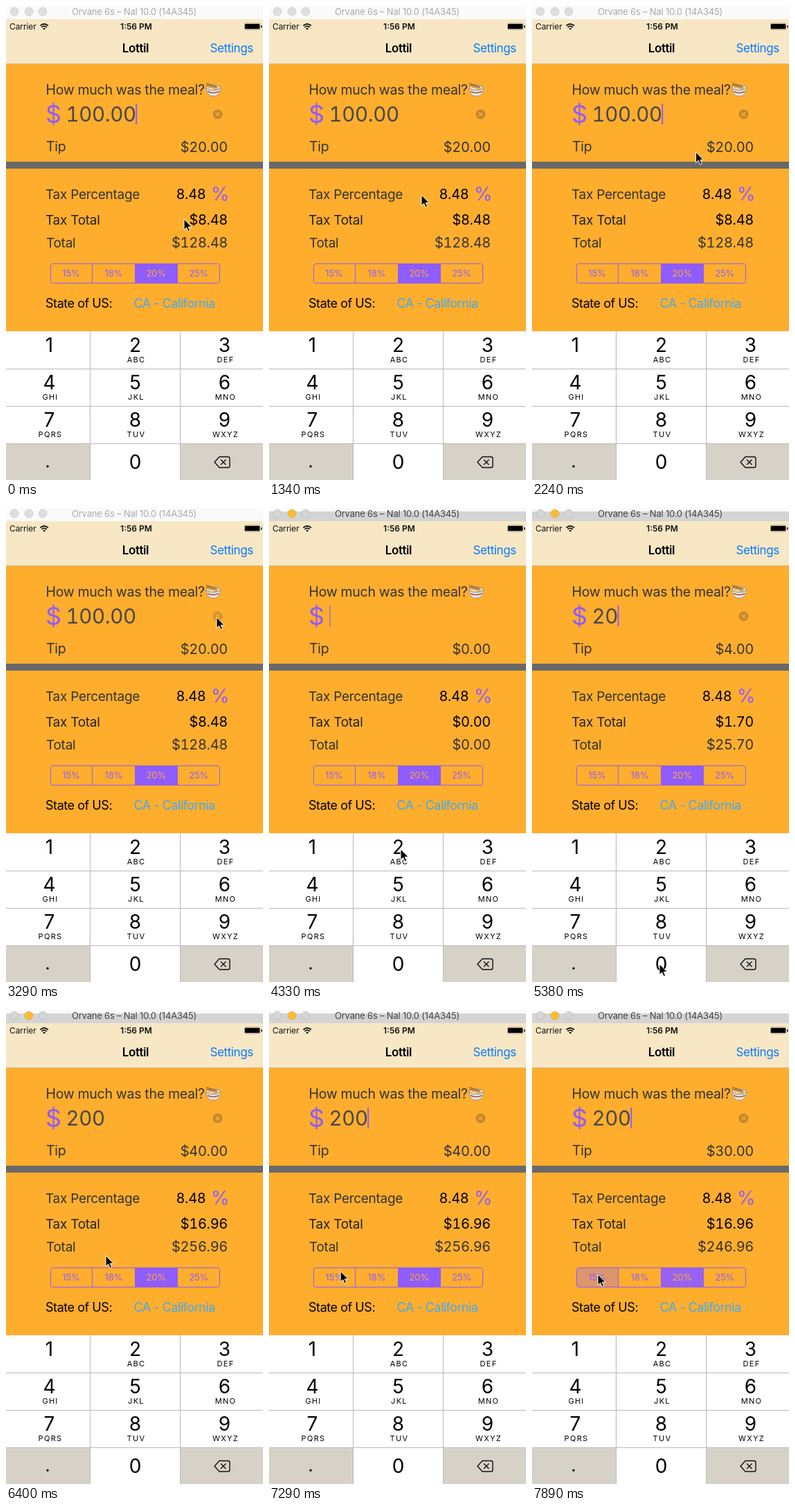
These frames come from a looping animation (371 px wide and 685 px high, 8000 ms). An HTML page:

```html
<!DOCTYPE html>
<html lang="en">
<head>
<meta charset="utf-8">
<title>Tip calculator</title>
<style>
  html, body { margin: 0; width: 100%; height: 100%; overflow: hidden; }
  svg { display: block; font-family: Inter, sans-serif; }
  text { white-space: pre; }
  .money { font-variant-numeric: tabular-nums; }
</style>
</head>
<body>
<svg id="stage" width="371" height="685" viewBox="0 0 371 685"></svg>
<script>
const LOOP = 8000, STEP = 148.8;
const ORANGE = '#ffad2d', PURPLE = '#8f5cff', INK = '#333';
const stage = document.getElementById('stage');

const rect = (x, y, w, h, fill, attrs = '') =>
  `<rect x="${x}" y="${y}" width="${w}" height="${h}" fill="${fill}" ${attrs}/>`;
const text = (x, y, size, str, fill = INK, spacing = 0, attrs = '') =>
  `<text x="${x}" y="${y}" font-size="${size}" fill="${fill}" letter-spacing="${spacing}" ${attrs}>${str}</text>`;
const path = (d, attrs) => `<path d="${d}" ${attrs}/>`;
const MID = 'text-anchor="middle"', END = 'text-anchor="end"';

function titleBar() {
  const lights = [12, 33, 53].map((x, i) =>
    `<circle id="light${i}" cx="${x}" cy="8" r="6" stroke="#000" stroke-opacity=".1"/>`).join('');
  return rect(0, 0, 371, 19, '#fafafa') + rect(0, 5, 371, 14, '#d4d4d4', 'id="bar"') + lights +
    text(185, 13, 13, 'Orvane 6s – Nal 10.0 (14A345)', '#aaa', -.2, `id="title" ${MID}`);
}

function header() {
  return rect(0, 19, 371, 64, '#f8e7c5') + rect(0, 83, 371, 1, '#d0b98e') +
    text(5, 33.5, 12, 'Carrier', '#111', -.1) +
    path('M49.5 28.5q5.7-5 11.4 0M51.5 30.8q3.7-3.2 7.4 0', 'fill="none" stroke="#111" stroke-width="1.7"') +
    path('M53.2 32.5q2-1.6 4 0l-2 2z', 'fill="#111"') +
    text(188, 33.5, 12, '1:56 PM', '#111', 0, `font-weight="600" ${MID}`) +
    rect(344.5, 25, 22, 9, 'none', 'rx="1.5" stroke="#111" stroke-opacity=".4"') +
    rect(345, 26, 21, 7, '#000', 'rx="1"') + rect(368, 28, 1.5, 3.5, '#111') +
    text(187, 67, 17, 'Lottil', '#000', -.4, `font-weight="600" ${MID}`) +
    text(294.5, 67, 17, 'Settings', '#0a7aff', -.4);
}

function noodles() {
  return path('M289 118q0 9 6.5 12h7.500q6.500-3 6.500-12z', 'fill="#e6e8e4" stroke="#8b8b83" stroke-width=".8"') +
    path('M291 123.500q8 4 16.500 0', 'fill="none" stroke="#b5493a" stroke-width="1.500"') +
    '<ellipse cx="299.200" cy="118" rx="10.300" ry="3.800" fill="#f2dca8" stroke="#8d8d86"/>' +
    path('M292 118.500q3.500-3 7 0t7 0', 'fill="none" stroke="#d49a3c" stroke-width="1.500"') +
    path('M289 111.500l16 5.500M289 114l15 4', 'stroke="#8e5630" stroke-width="1.200"');
}

function form() {
  const value = (id, y, fill) => text(320, y, 20, '', fill, -.3, `id="${id}" class="money" ${END}`);
  return rect(0, 84, 371, 386, ORANGE) + rect(0, 225, 371, 10, '#696969') +
    text(57.5, 128, 19.5, 'How much was the meal?', INK, -.3) + noodles() +
    text(57, 169, 36, '$', PURPLE) +
    text(86.5, 167, 29.5, '', '#484848', -.4, 'id="amount" class="money"') +
    rect(0, 141, 2, 30, PURPLE, 'id="caret"') +
    '<g id="clear"><circle cx="305.5" cy="156.5" r="7" fill="#c5882f"/>' +
    path('M302.8 153.8l5.4 5.4m0-5.4l-5.4 5.4', `stroke="${ORANGE}" stroke-width="1.3"`) + '</g>' +
    text(58, 210, 19.5, 'Tip', INK, -.3) + value('tip', 210.5, INK) +
    text(57, 279, 19, 'Tax Percentage', INK, -.28) +
    text(288.5, 279, 20, '8.48', '#000', -.3, `class="money" ${END}`) +
    text(296, 281, 27, '%', PURPLE) +
    text(57, 316, 19, 'Tax Total', '#222', -.28) + value('tax', 316, '#000') +
    text(58, 348.5, 19, 'Total', INK, -.28) + value('total', 348.5, INK) +
    segments() +
    text(57, 436, 18, 'State of US:', '#000', -.45) +
    text(184.5, 436, 18, 'CA - California', '#43aaf0', -.5);
}

function segments() {
  const labels = ['15%', '18%', '20%', '25%'].map((s, i) =>
    text(94 + i * 61.4, 391, 13, s, i === 2 ? ORANGE : PURPLE, -.1, MID)).join('');
  return rect(65, 373, 59.5, 27, PURPLE, 'id="pressed"') +
    rect(186, 373, 62, 27, PURPLE, 'id="selected"') +
    rect(64.5, 372.5, 244, 28, 'none', `rx="3" stroke="${PURPLE}"`) +
    path('M124.5 373v27M186.5 373v27M247.5 373v27', `stroke="${PURPLE}"`) + labels;
}

function keypad() {
  const letters = ['', 'ABC', 'DEF', 'GHI', 'JKL', 'MNO', 'PQRS', 'TUV', 'WXYZ'];
  const columns = [62.5, 186.5, 315.5];
  const keys = letters.map((word, i) => {
    const x = columns[i % 3], y = 500 + Math.floor(i / 3) * 54;
    return text(x, y, 28, i + 1, '#000', 0, MID) +
      text(x + 1.5, y + 15, 11, word, '#000', 1.3, MID);
  }).join('');
  return rect(0, 470, 371, 215, '#fff') +
    rect(0, 633, 121, 52, '#d6d2c8') + rect(252, 633, 119, 52, '#d6d2c8') +
    rect(122, 0, 129, 53, '#d6d2c8', 'id="keyDown"') +
    path('M0 524.5h371M0 578.5h371M0 632.5h371M121.5 470v215M251.5 470v215', 'stroke="#b9b9b9"') +
    keys + text(186.5, 669, 28, '0', '#000', 0, MID) +
    text(60, 667, 26, '.', '#000', 0, MID) +
    path('M308 651.5h12.5q2.5 0 2.5 2.5v10.5q0 2.5-2.5 2.5h-12.5l-7-7.7z', 'fill="none" stroke="#111" stroke-width="1.4" stroke-linejoin="round"') +
    path('M310 655.5l7.5 7.5m0-7.5l-7.5 7.5', 'stroke="#111" stroke-width="1.4"');
}

stage.innerHTML = titleBar() + header() + form() + keypad() +
  path('M0 0V15.5l3.6-3.3 2.5 5.6 2.5-1.1-2.4-5.4h4.9z', 'id="cursor" stroke="#fff"');

const el = {};
for (const node of stage.querySelectorAll('[id]')) el[node.id] = node;
const set = (id, name, value) => el[id].setAttribute(name, value);

// [step, x, y] of the pointer tip
const pointer = [
  [0, 257, 308], [2, 274, 400], [4, 250, 538], [5, 246, 540], [8, 219, 341], [9, 220, 273],
  [10, 220, 273], [13, 170, 262], [17, 303, 160], [19, 304, 162], [22, 304, 158], [23, 304, 158],
  [25, 240, 500], [26, 196, 651], [28, 189, 497], [29, 190, 493], [32, 190, 493],
  [34, 184, 659], [38, 184, 659], [43, 144, 355], [49, 95, 382], [54, 95, 382]
];

function pointerAt(step) {
  const i = Math.max(1, pointer.findIndex(p => p[0] >= step));
  const [s0, x0, y0] = pointer[i - 1], [s1, x1, y1] = pointer[i];
  const k = (step - s0) / (s1 - s0);
  return [x0 + (x1 - x0) * k, y0 + (y1 - y0) * k];
}

function caretOpacity(step) {
  if (step >= 35 && step < 40) return 1;
  const phase = (step * STEP + (step < 23 ? 60 : 0)) % 1000;
  return phase >= 800 || phase < 300 ? 1 : Math.max(0, 1 - (phase - 300) / 35);
}

function render(time) {
  const step = Math.floor(time % LOOP / STEP);
  const active = step >= 23;
  const amount = step < 23 ? '100.00' : step < 31 ? '' : step < 36 ? '2' : step < 39 ? '20' : '200';

  set('bar', 'opacity', active ? 1 : 0);
  set('title', 'fill', active ? '#444' : '#aaa');
  for (let i = 0; i < 3; i++)
    set('light' + i, 'fill', !active ? '#dedede' : i === 1 ? '#fdbc2f' : '#d6d6d6');

  const tip = amount * (step >= 53 ? .15 : .2), tax = amount * .0848;
  const money = { tip, tax, total: +amount + tip + tax };
  for (const id in money) el[id].textContent = '$' + money[id].toFixed(2);
  el.amount.textContent = amount;
  set('caret', 'x', amount ? 86 + el.amount.getComputedTextLength() : 87);
  set('caret', 'opacity', caretOpacity(step));
  set('clear', 'opacity', !amount ? 0 : step === 22 ? .7 : 1);

  const down = step === 30 ? 470 : step === 35 || step === 38 ? 633 : null;
  set('keyDown', 'y', down || 0);
  set('keyDown', 'opacity', down ? 1 : 0);
  set('pressed', 'opacity', step >= 51 ? .3 : 0);
  set('selected', 'opacity', step >= 53 ? .92 : 1);
  set('cursor', 'transform', `translate(${pointerAt(step)})`);
}

function tick() {
  render(performance.now());
  requestAnimationFrame(tick);
}
tick();
</script>
</body>
</html>
```
